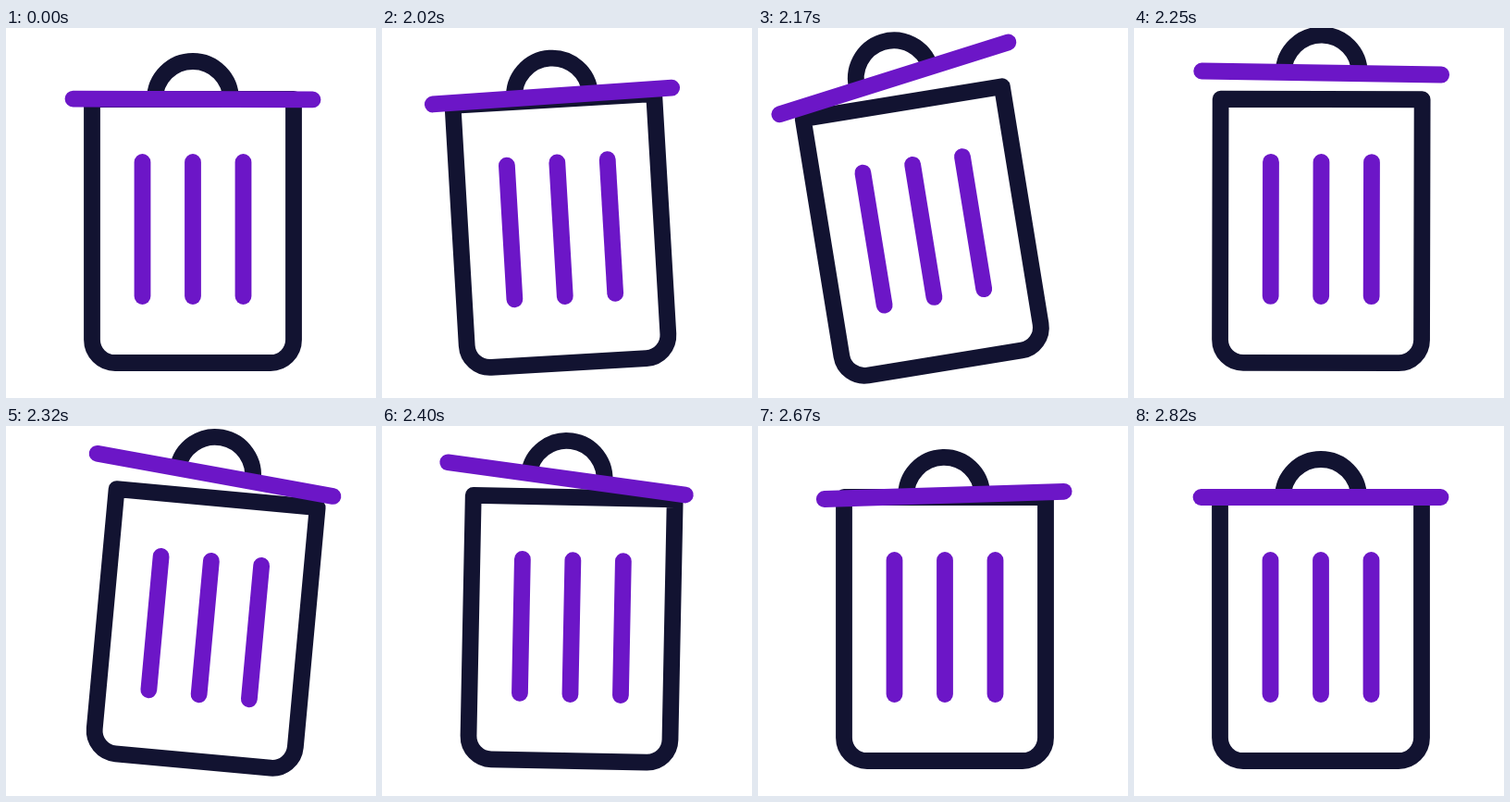
An HTML page with a canvas that plays this animation: 400x400 px, repeating every 2850 ms.

```html
<!DOCTYPE html>
<html lang="en">
<head>
<meta charset="utf-8">
<title>Trash can</title>
<style>
html, body { margin: 0; width: 100%; height: 100%; overflow: hidden; background: #fff; }
canvas { display: block; width: 100vmin; height: 100vmin; }
</style>
</head>
<body>
<canvas id="stage" width="400" height="400"></canvas>
<script>
const ctx = document.getElementById('stage').getContext('2d');
const LOOP = 2850;
const STEP = 25;
const NAVY = '#121331';
const PURPLE = '#6c16c7';
const PIVOT = { x: 202, y: 362 };

const easeOut = x => 1 - Math.pow(1 - x, 2.53);
const easeSine = x => (1 - Math.cos(Math.PI * x)) / 2;

// Body swing: [time, degrees]
const swing = [[2000, 0], [2160, -9.6], [2311, 5.4], [2466, -1.5], [2515, 0]];

// Lid relative to the body: [time, shift, lift, tilt in degrees]
const lidKeys = [
  [2000, 0, 0, 0.2],
  [2025, -1.1, 4, -0.6],
  [2175, -5, 27.5, -8.25],
  [2250, 0, 28.5, 0.75],
  [2400, -8.6, 20, 6.65],
  [2550, -3, 6, -0.25],
  [2640, -1.2, 3, -2.7],
  [2740, -0.3, 0.8, 0.6],
  [2825, 0, 0, 0]
];

function segment(keys, t) {
  let i = 0;
  while (i < keys.length - 2 && t >= keys[i + 1][0]) i++;
  const a = keys[i][0], b = keys[i + 1][0];
  return [i, Math.min(1, Math.max(0, (t - a) / (b - a)))];
}

function bodyAngle(t) {
  const [i, x] = segment(swing, t);
  const e = i === 0 ? easeOut(x) : easeSine(x);
  return swing[i][1] + (swing[i + 1][1] - swing[i][1]) * e;
}

function slope(keys, i, c) {
  if (i === 0 || i === keys.length - 1) return 0;
  const p = keys[i - 1], n = keys[i + 1];
  return (n[c] - p[c]) / (n[0] - p[0]);
}

// Smooth curve through the keys of one column
function curve(keys, t, c) {
  const [i, x] = segment(keys, t);
  const a = keys[i], b = keys[i + 1], d = b[0] - a[0];
  const x2 = x * x, x3 = x2 * x;
  return a[c] * (2 * x3 - 3 * x2 + 1) + b[c] * (3 * x2 - 2 * x3)
    + d * slope(keys, i, c) * (x3 - 2 * x2 + x)
    + d * slope(keys, i + 1, c) * (x3 - x2);
}

function rotate(deg) {
  ctx.rotate(deg * Math.PI / 180);
}

function line(x1, y1, x2, y2) {
  ctx.beginPath();
  ctx.moveTo(x1, y1);
  ctx.lineTo(x2, y2);
  ctx.stroke();
}

function drawBody() {
  ctx.strokeStyle = NAVY;
  ctx.beginPath();
  ctx.moveTo(93, 77);
  ctx.lineTo(311, 77);
  ctx.arcTo(311, 362, 202, 362, 25);
  ctx.arcTo(93, 362, 93, 77, 25);
  ctx.closePath();
  ctx.stroke();
  ctx.strokeStyle = PURPLE;
  ctx.lineCap = 'round';
  for (const x of [147.5, 202, 256.5]) line(x, 145, x, 290);
}

function drawLid(t) {
  ctx.translate(202 + curve(lidKeys, t, 1), 77 - curve(lidKeys, t, 2));
  rotate(curve(lidKeys, t, 3));
  ctx.strokeStyle = NAVY;
  ctx.lineCap = 'butt';
  ctx.beginPath();
  ctx.arc(0, 0, 41, Math.PI, 2 * Math.PI);
  ctx.stroke();
  ctx.strokeStyle = PURPLE;
  ctx.lineCap = 'round';
  line(-129.5, 0, 129.5, 0);
}

function draw(t) {
  ctx.fillStyle = '#fff';
  ctx.fillRect(0, 0, 400, 400);
  ctx.save();
  ctx.lineWidth = 17.8;
  ctx.lineJoin = 'round';
  ctx.translate(PIVOT.x, PIVOT.y);
  rotate(bodyAngle(t));
  ctx.translate(-PIVOT.x, -PIVOT.y);
  drawBody();
  drawLid(t);
  ctx.restore();
}

const start = performance.now();

function tick() {
  const t = Math.max(0, performance.now() - start) % LOOP;
  // 40 poses per second, each shown from the nearest lower 10 ms
  const pose = Math.floor((Math.floor(t / 10) * 10 + 5) / STEP);
  draw(pose * STEP);
  requestAnimationFrame(tick);
}
tick();
</script>
</body>
</html>
```
